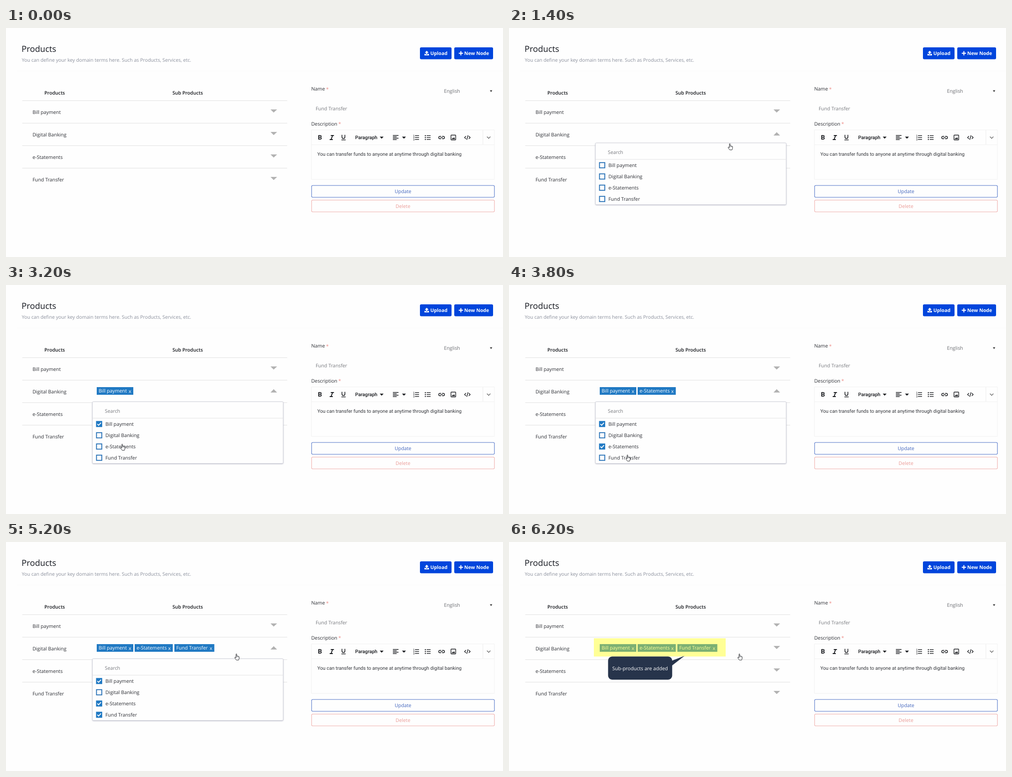
These frames come from a looping animation (1101x509 px, 8000 ms). An HTML page with a canvas:

```html
<!DOCTYPE html>
<html lang="en">
<head>
<meta charset="utf-8">
<title>Products</title>
<style>
html, body { margin: 0; width: 100%; height: 100%; overflow: hidden; background: #fefefe; }
canvas { display: block; }
</style>
</head>
<body>
<canvas id="stage" width="1101" height="509"></canvas>
<script>
const ctx = document.getElementById('stage').getContext('2d');
const LOOP = 8000, STEP = 200;
const SANS = '"Open Sans", sans-serif', ROBOTO = 'Roboto, sans-serif';
const INK = '#2b2d33', BLUE = '#2079c3', ICON = '#17191d';
const ITEMS = ['Bill payment', 'Digital Banking', 'e-Statements', 'Fund Transfer'];

// Each chosen item: time, index in ITEMS, chip left and right edge
const PICKS = [
  { at: 2800, item: 0, x: 201, end: 282 },
  { at: 3400, item: 2, x: 285, end: 369.5 },
  { at: 4000, item: 3, x: 373, end: 461.5 }
];
const OPEN = 600, CLOSE = 5600, CALLOUT = 6000;

// Pointer path: time, x, y
const PATH = [
  [200, 540, 258], [400, 592, 236], [800, 592, 236], [2400, 253, 301],
  [2800, 253, 301], [3200, 253, 353], [3400, 253, 353], [3800, 258, 377],
  [4000, 258, 377], [4400, 304, 391], [5000, 506, 248]
];
const HAND = new Path2D('M3.5 1.5C3.5.2 5.3.2 5.3 1.5V5.2Q6.6 4.5 7 5.7Q8.3 5.1 8.7 6.3' +
  'Q10.4 5.9 10.5 7.5V10Q10.3 12 9.3 14.4H4.3Q2 11.7.8 9.4Q.4 7.9 1.8 8Q2.8 8.5 3.5 9.6Z');

function text(str, x, cy, color = INK, size = 10.8, weight = 400, family = SANS, align = 'left') {
  ctx.font = `${weight} ${size}px ${family}`;
  ctx.textAlign = align;
  ctx.fillStyle = color;
  ctx.fillText(str, x, cy + size * 0.36);
}

function rect(x, y, w, h, color) {
  ctx.fillStyle = color;
  ctx.fillRect(x, y, w, h);
}

function round(x, y, w, h, r, fill, stroke, width = 1) {
  ctx.beginPath();
  ctx.roundRect(x, y, w, h, r);
  if (fill) { ctx.fillStyle = fill; ctx.fill(); }
  if (stroke) { ctx.strokeStyle = stroke; ctx.lineWidth = width; ctx.stroke(); }
}

function poly(color, ...pts) {
  ctx.beginPath();
  for (let i = 0; i < pts.length; i += 2) ctx.lineTo(pts[i], pts[i + 1]);
  ctx.closePath();
  ctx.fillStyle = color;
  ctx.fill();
}

function line(color, width, ...pts) {
  ctx.beginPath();
  for (let i = 0; i < pts.length; i += 2) ctx.lineTo(pts[i], pts[i + 1]);
  ctx.strokeStyle = color;
  ctx.lineWidth = width;
  ctx.stroke();
}

function header() {
  text('Products', 34.5, 46, '#14171f', 18.6, 500);
  text('You can define your key domain terms here. Such as Products, Services, etc.',
    35, 71, '#8a8f9c', 10.68);
  rect(24, 95, 1077, 1, '#fafafa');

  round(917, 43, 70, 26.5, 3, '#0045dc');
  poly('#fff', 932, 50.5, 936.2, 55, 933.5, 55, 933.5, 58.3, 930.5, 58.3, 930.5, 55, 927.8, 55);
  rect(927, 57.5, 2.8, 3.2, '#fff');
  rect(934.2, 57.5, 2.8, 3.2, '#fff');
  rect(927, 59, 10, 1.8, '#fff');
  text('Upload', 940, 56.2, '#fff', 10.7, 700);

  round(993, 43, 86, 26.5, 3, '#0045dc');
  rect(1003, 55, 9.4, 2.2, '#fff');
  rect(1006.6, 51.4, 2.2, 9.4, '#fff');
  text('New Node', 1015, 56.2, '#fff', 10.7, 700);
}

function table(open) {
  text('Products', 85, 144.6, '#15171c', 10.67, 600);
  text('Sub Products', 402.4, 144.6, '#15171c', 10.67, 600, SANS, 'center');
  ITEMS.forEach((name, i) => {
    const y = 161 + i * 50;
    rect(36, y, 587, 1, '#e0e0e0');
    text(name, 58.7, y + 25.8);
    if (open && i === 1) poly('#b2b2b2', 586, 239, 593, 231.5, 600.5, 239);
    else poly('#b2b2b2', 586, y + 20, 600.5, y + 20, 593, y + 27);
  });
}

function toolbar() {
  text('B', 691, 243.4, ICON, 14, 700, ROBOTO);
  line(ICON, 2, 719.5, 239, 726.5, 239);
  line(ICON, 2, 717, 248, 724, 248);
  line(ICON, 2, 723.4, 239, 720.2, 248);
  ctx.beginPath();
  ctx.moveTo(744.3, 237.5);
  ctx.lineTo(744.3, 242.6);
  ctx.arc(747.5, 242.6, 3.2, Math.PI, 0, true);
  ctx.lineTo(750.7, 237.5);
  ctx.lineWidth = 1.6;
  ctx.strokeStyle = ICON;
  ctx.stroke();
  rect(743, 248, 9.5, 1.4, ICON);

  text('Paragraph', 773.4, 243, ICON, 10.7, 500, ROBOTO);
  poly(ICON, 828, 241.5, 836.5, 241.5, 832.2, 246);
  [12.5, 8.5, 12.5, 8.5].forEach((w, i) => rect(857, 238 + i * 3.1, w, 1.5, ICON));
  poly(ICON, 877.2, 241.5, 886, 241.5, 881.6, 246);

  for (let i = 0; i < 3; i++) {
    const y = 239.3 + i * 4.2;
    text(String(i + 1), 902, y, ICON, 5.2, 500, ROBOTO);
    rect(906, y - 0.7, 9, 1.4, ICON);
    ctx.beginPath();
    ctx.arc(929, y, 1.2, 0, 7);
    ctx.fill();
    rect(932, y - 0.7, 8.6, 1.4, ICON);
  }

  ctx.strokeStyle = ICON;
  ctx.lineWidth = 1.5;
  ctx.beginPath();
  ctx.moveTo(964, 240.7);
  ctx.arc(961.4, 243.5, 2.8, -Math.PI / 2, Math.PI / 2, true);
  ctx.lineTo(964, 246.3);
  ctx.moveTo(966, 240.7);
  ctx.arc(968.6, 243.5, 2.8, -Math.PI / 2, Math.PI / 2);
  ctx.lineTo(966, 246.3);
  ctx.moveTo(962.3, 243.5);
  ctx.lineTo(967.7, 243.5);
  ctx.stroke();

  round(985.7, 238, 10.6, 10.8, 1, null, ICON, 1.4);
  poly(ICON, 987.2, 247, 989.3, 244, 990.6, 245.5, 992.6, 242.7, 995, 247);

  line(ICON, 1.4, 1019, 240.2, 1015.9, 243.4, 1019, 246.6);
  line(ICON, 1.4, 1025.2, 240.2, 1028.3, 243.4, 1025.2, 246.6);
  line(ICON, 1.4, 1023.5, 238.5, 1020.7, 248.5);
  line('#555', 1.2, 1065.5, 241.5, 1069.3, 245.3, 1073.1, 241.5);
}

function form() {
  text('Name', 676.2, 135.6);
  text('*', 709, 136, '#ee8b85');
  text('English', 970.2, 140.3, '#6b6d72');
  poly('#444', 1072, 138.2, 1077.2, 138.2, 1074.6, 142.8);
  text('Fund Transfer', 686, 179.4, '#77797e');
  text('Description', 676.2, 212.8);
  text('*', 736.3, 213.3, '#ee8b85');

  round(676.5, 226.5, 405.5, 110, 0, null, '#f1f1f1');
  rect(677, 259, 405, 1, '#f1f1f1');
  rect(1056, 227, 1, 32, '#ececec');
  toolbar();
  text('You can transfer funds to anyone at anytime through digital banking',
    689.7, 280, '#33353a', 10.67, 400, ROBOTO);

  round(677, 350, 405, 26.3, 2.5, null, '#4a6fc6', 1.1);
  text('Update', 879.4, 363.3, '#4265bd', 10.8, 400, SANS, 'center');
  round(677, 382.5, 405, 26.3, 2.5, null, '#eeaaa6', 1.1);
  text('Delete', 879.4, 396, '#ea9a95', 10.8, 400, SANS, 'center');
}

function chips(picks) {
  for (const p of picks) {
    rect(p.x, 227, p.end - p.x, 17, BLUE);
    text(ITEMS[p.item], p.x + 4.2, 235.6, '#fff');
    text('x', p.end - 10.3, 236.2, '#fff');
  }
}

function dropdown(picks) {
  const y = picks.length ? 259.5 : 255.5;
  ctx.save();
  ctx.shadowColor = 'rgba(50,55,100,.42)';
  ctx.shadowBlur = 3;
  ctx.shadowOffsetY = 1;
  round(191.5, y, 422.5, 137, 2, '#fefefe');
  ctx.restore();
  round(191.5, y, 422.5, 137, 2, null, '#cfd0d8');
  rect(192, y + 36, 421.5, 1, '#e2e2e4');
  text('Search', 219, y + 20.5, '#77797e');

  ITEMS.forEach((name, i) => {
    const cy = y + 49.5 + i * 25;
    if (picks.some(p => p.item === i)) {
      rect(199.5, cy - 6.7, 13.6, 13.4, BLUE);
      line('#fff', 2, 202.4, cy, 205.2, cy + 2.9, 210.4, cy - 2.8);
    } else {
      ctx.strokeStyle = '#2c74b8';
      ctx.lineWidth = 2;
      ctx.strokeRect(200.5, cy - 5.8, 11.7, 11.6);
    }
    text(name, 220.3, cy + 0.3);
  });
}

function callout(alpha) {
  ctx.globalAlpha = alpha;
  rect(188, 214, 292, 40.5, 'rgba(255,255,0,.41)');
  round(219.5, 254.5, 142, 51.5, 9, '#27344b');
  poly('#27344b', 389, 253, 358, 265, 358, 277);
  text('Sub-products are added', 290.4, 280.6, '#fff', 11, 400, SANS, 'center');
  ctx.globalAlpha = 1;
}

function pointer(t) {
  if (t < PATH[0][0]) return;
  const next = PATH.findIndex(k => k[0] > t);
  let [, x, y] = PATH[PATH.length - 1];
  if (next > 0) {
    const [t0, x0, y0] = PATH[next - 1], [t1, x1, y1] = PATH[next];
    const p = (t - t0) / (t1 - t0), e = p * p * (3 - 2 * p);
    x = x0 + (x1 - x0) * e;
    y = y0 + (y1 - y0) * e;
  }
  ctx.save();
  ctx.translate(x, y);
  ctx.fillStyle = '#fff';
  ctx.fill(HAND);
  ctx.strokeStyle = '#26282c';
  ctx.lineWidth = 1;
  ctx.stroke(HAND);
  line('#55585e', 0.7, 5.3, 5, 5.3, 8);
  line('#55585e', 0.7, 7.1, 5.7, 7.1, 8);
  line('#55585e', 0.7, 8.8, 6.3, 8.8, 8.3);
  ctx.restore();
}

function draw(now) {
  const t = Math.floor((now % LOOP) / STEP) * STEP;
  const open = t >= OPEN && t < CLOSE;
  const picks = PICKS.filter(p => t >= p.at);
  rect(0, 0, 1101, 509, '#fefefe');
  ctx.textRendering = 'geometricPrecision';
  header();
  table(open);
  form();
  chips(picks);
  if (open) dropdown(picks);
  if (t >= CALLOUT) callout(t > CALLOUT ? 1 : 0.5);
  pointer(t);
}

const start = performance.now();
function frame() {
  draw(performance.now() - start);
  requestAnimationFrame(frame);
}
frame();
</script>
</body>
</html>
```
